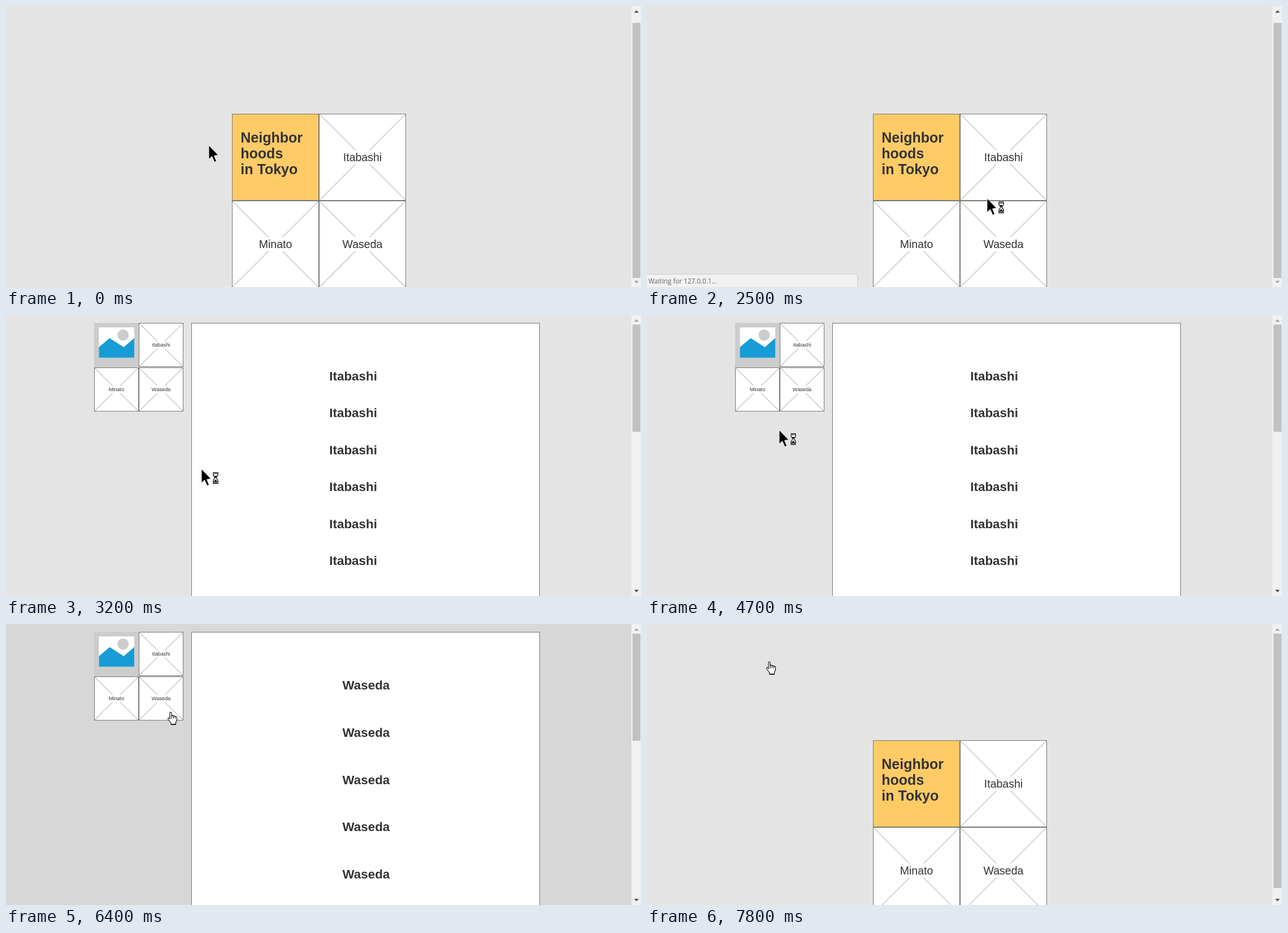
An HTML page for the animation above (8000 ms loop, 1124x498 px).

```html
<!DOCTYPE html>
<html lang="en">
<head>
<meta charset="utf-8">
<title>Neighborhoods</title>
<style>
  html, body { margin: 0; width: 100%; height: 100%; overflow: hidden; background: #e4e4e4; }
  svg { display: block; width: 100vw; height: 100vh; }
  text { font-family: "Liberation Sans", Arial, sans-serif; fill: #333; }
  .middle { text-anchor: middle; }
  .bold { font-weight: bold; }
  .frame { fill: #fff; stroke: #777; }
  .cross { stroke: #999; fill: none; }
</style>
</head>
<body>
<svg id="stage" viewBox="0 0 1124 498">
  <rect id="back" width="1124" height="498"/>
  <g id="home"></g>
  <g id="detail"></g>
  <g id="status">
    <path d="M-1 475.5H368Q372.5 475.5 372.5 480V499H-1Z" fill="#f2f2f2" stroke="#cbcbcb"/>
    <text x="2.5" y="491.5" style="font:11.7px 'Open Sans',sans-serif;fill:#666">Waiting for 127.0.0.1...</text>
  </g>
  <rect x="1107" width="17" height="498" fill="#f1f1f1"/>
  <rect id="thumb" x="1109" width="14" fill="#c1c1c1"/>
  <path id="up" d="M1112 12L1116 7.5L1120 12Z"/>
  <path id="down" d="M1112 487L1116 491.5L1120 487Z"/>
  <g id="arrow">
    <path d="M0 0V24.5L5.5 19.5L10 29.5L13.5 28L9.5 18.5L16.5 17Z" stroke="#fff" stroke-width=".8"/>
    <g id="busy">
      <path d="M19 5H31V10L27.5 15.5L31 21V27H19V21L22.5 15.5L19 10Z" fill="#fff"/>
      <path d="M20 6.5H30M20 9H30M20 23H30M20 25.5H30" stroke="#000" stroke-width="1.4"/>
      <path d="M21 9V11L24 15.5L21 20V23H29V20L26 15.5L29 11V9" fill="#fff" stroke="#000" stroke-width="1.2"/>
      <path d="M22.5 12H27.5L25 15.5ZM22 22L25 18.5L28 22Z"/>
    </g>
  </g>
  <g id="hand" stroke="#000" stroke-width="1.1" stroke-linejoin="round">
    <path fill="#fff" d="M4 13V2Q4 .5 5.5 .5T7 2V7.5Q7.2 6.3 8.7 6.4T10.3 8Q10.6 6.9 12 7.2T13.4 8.8Q14 7.8 15.3 8.4T16.5 10.5V15L14.5 19V22.5H6V20L1 13.5Q.2 11.2 1.8 10.8T4 13Z"/>
    <path fill="none" d="M7 7.5V12M10.3 8V12M13.4 8.8V12"/>
    <path d="M6 22.3H14.5" stroke-width="1.6"/>
  </g>
</svg>
<script>
const LOOP = 8000, STEP = 100;
const el = id => document.getElementById(id);

const text = (str, x, y, size, cls) =>
  `<text x="${x}" y="${y}" font-size="${size}" class="${cls}">${str}</text>`;

// Crossed box whose label sits on a white strip
function cell(label, x, y, w, h, size, strip) {
  const cx = x + w / 2, cy = y + h / 2;
  return `<rect class="frame" x="${x}" y="${y}" width="${w}" height="${h}"/>
    <path class="cross" d="M${x} ${y}l${w} ${h}M${x + w} ${y}l${-w} ${h}"/>
    <rect x="${cx - strip}" y="${cy - strip / 2}" width="${strip * 2}" height="${strip}" fill="#fff"/>
    ${text(label, cx, cy + size * 0.36, size, "middle")}`;
}

const title = ["Neighbor", "hoods", "in Tokyo"]
  .map((line, i) => text(line, 415.3, 242 + 28 * i, 25, "bold")).join("");

el("home").innerHTML =
  `<rect x="400.5" y="191.5" width="153" height="153" fill="#ffcb66" stroke="#777"/>` + title +
  cell("Itabashi", 554.5, 191.5, 153, 153, 19.5, 25) +
  cell("Minato", 400.5, 345.5, 153, 153, 19.5, 25) +
  cell("Waseda", 554.5, 345.5, 153, 153, 19.5, 25);

const lists = {
  Itabashi: { x: 572.3, pitch: 65.4, rows: 6, back: "#e4e4e4" },
  Minato: { x: 596, pitch: 71.6, rows: 6, back: "#dedede" },
  Waseda: { x: 595.5, pitch: 83.8, rows: 5, back: "#d7d7d7" }
};

const listMarkup = ([name, { x, pitch, rows }]) =>
  `<g id="${name}">` + Array.from({ length: rows }, (_, i) =>
    text(name, x, 116 + pitch * i, 22.4, "bold")).join("") + `</g>`;

el("detail").innerHTML =
  `<rect x="156" y="14" width="79" height="79" fill="#ccc"/>
   <rect x="164.5" y="22" width="62.5" height="54" fill="#fff"/>
   <circle cx="207.3" cy="35.5" r="10" fill="#ccc"/>
   <path d="M164.5 57L183.5 41L208.5 57L227 41V75.7H164.5Z" fill="#189cd6"/>` +
  cell("Itabashi", 235.5, 14.5, 78, 77, 9.2, 13) +
  cell("Minato", 156.5, 93.5, 78, 77, 9.2, 13) +
  cell("Waseda", 235.5, 93.5, 78, 77, 9.2, 13) +
  `<rect class="frame" x="328.5" y="14.5" width="616" height="600"/>` +
  Object.entries(lists).map(listMarkup).join("");

const linear = u => u;
const smooth = u => u * u * (3 - 2 * u);
const easeOut = u => 1 - (1 - u) ** 1.5;

// Pointer hot spot: time, x, y, easing towards that point
const path = [
  [0, 359, 246.5], [600, 359, 246.5], [1500, 614.5, 314, smooth], [1700, 623, 308],
  [2200, 623, 308], [2500, 602, 341], [3100, 382, 285], [3200, 346, 273],
  [3900, 203, 136, easeOut], [4500, 203, 136], [4700, 234, 204], [5000, 258, 235, easeOut],
  [5100, 258, 235], [5800, 290.5, 155.5, smooth], [6600, 290.5, 155.5],
  [7400, 216, 67, smooth], [LOOP, 216, 67]
];
const handTimes = [[1300, 1900], [3700, 4300], [5700, 6000], [6400, LOOP]];
const busyTimes = [[2100, 3300], [4300, 4900]];
const pages = [[0, "home"], [2700, "Itabashi"], [4900, "Minato"], [6300, "Waseda"], [7800, "home"]];

const within = (ranges, t) => ranges.some(([from, to]) => t >= from && t < to);
const show = (id, on) => el(id).setAttribute("display", on ? "inline" : "none");

function pointerAt(t) {
  const i = path.findIndex(p => p[0] > t);
  const [t0, x0, y0] = path[i - 1], [t1, x1, y1, ease = linear] = path[i];
  const u = ease((t - t0) / (t1 - t0));
  return [x0 + (x1 - x0) * u, y0 + (y1 - y0) * u];
}

function scrollbar(top, bottom, atEnd) {
  el("thumb").setAttribute("y", top);
  el("thumb").setAttribute("height", bottom - top);
  el("up").setAttribute("fill", atEnd ? "#505050" : "#a3a3a3");
  el("down").setAttribute("fill", atEnd ? "#a3a3a3" : "#505050");
}

function render(time) {
  const t = Math.floor(time % LOOP / STEP) * STEP;
  const page = pages.filter(p => p[0] <= t).pop()[1];
  const isHome = page === "home", scrolled = isHome && t < 2700;

  el("back").setAttribute("fill", isHome ? "#e4e4e4" : lists[page].back);
  show("home", isHome);
  show("detail", !isHome);
  el("home").setAttribute("transform", `translate(0 ${scrolled ? 0 : 15})`);
  for (const name in lists) show(name, name === page);
  show("status", t >= 2400 && t < 2700);

  if (scrolled) scrollbar(30, 482, true);
  else scrollbar(17, isHome ? 468 : 207, false);

  const [x, y] = pointerAt(t).map(Math.round), isHand = within(handTimes, t);
  show("hand", isHand);
  show("arrow", !isHand);
  show("busy", within(busyTimes, t));
  el("arrow").setAttribute("transform", `translate(${x} ${y})`);
  el("hand").setAttribute("transform", `translate(${x - 5} ${y - 0.5})`);
}

const start = performance.now();
function tick() {
  render(performance.now() - start);
  requestAnimationFrame(tick);
}
tick();
</script>
</body>
</html>
```
